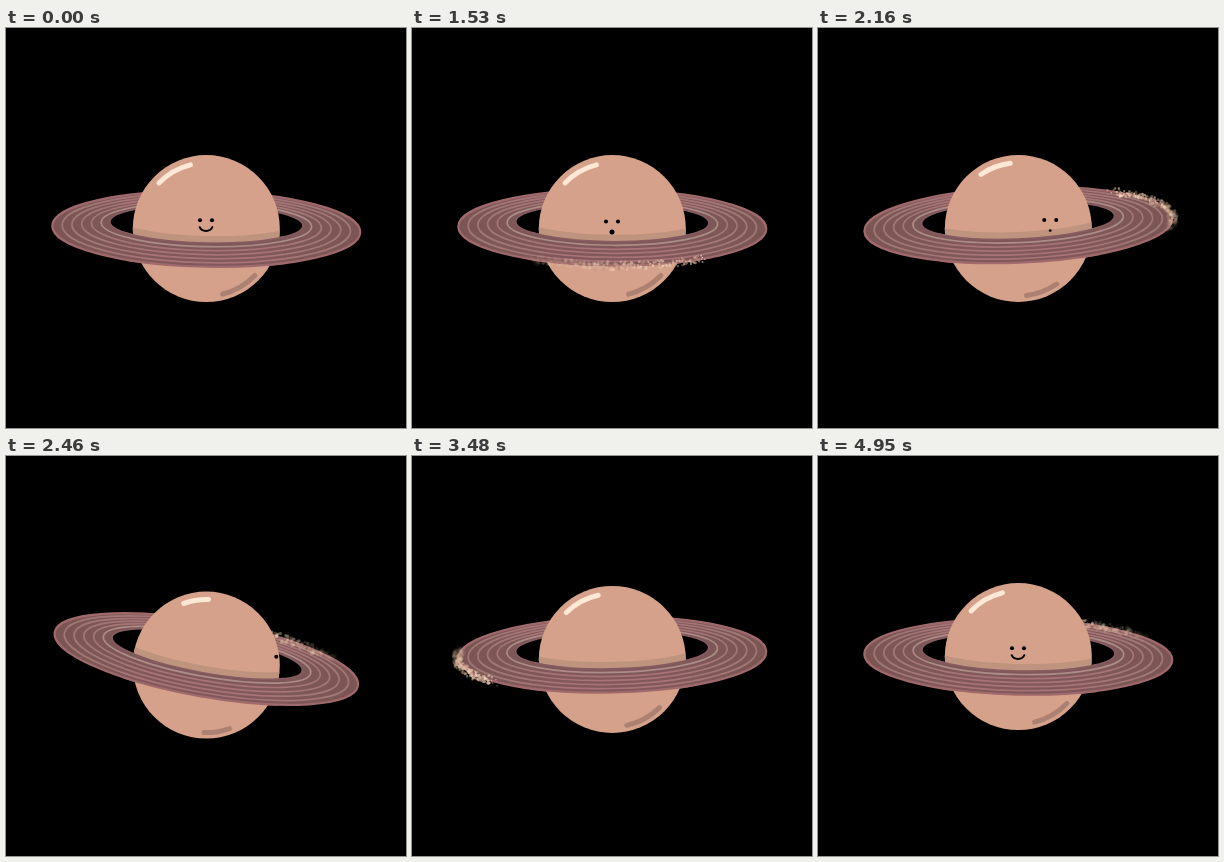
Write an HTML page with a canvas that moves like this. It is 400 px wide and 400 px high and loops after 4.98 s.

```html
<!DOCTYPE html>
<html lang="en">
<head>
<meta charset="utf-8">
<title>Ringed planet</title>
<style>
  html, body { margin: 0; width: 100%; height: 100%; overflow: hidden; background: #000; }
  canvas { display: block; width: 100vmin; height: 100vmin; }
</style>
</head>
<body>
<canvas id="stage"></canvas>
<script>
const LOOP = 4980, STEP = 30, ORBIT = LOOP / 2;
const LAND = 2460, HOP = 430;
const CX = 200.3, R = 73.5;
const TAU = Math.PI * 2, RAD = Math.PI / 180;
const { sin, cos, exp, max, min } = Math;

const canvas = document.getElementById('stage');
const g = canvas.getContext('2d');
const ratio = max(1, window.devicePixelRatio || 1);
canvas.width = canvas.height = 400 * ratio;

const ease = (t, from, to) => {
  const u = min(1, max(0, (t - from) / (to - from)));
  return u * u * (3 - 2 * u);
};
const hump = (t, from, to) => t > from && t < to ? sin(Math.PI * (t - from) / (to - from)) ** 2 : 0;
const noise = n => {
  const s = sin(n * 127.1 + 11.7) * 43758.5453;
  return s - Math.floor(s);
};

// Everything that moves, derived from the time.
function pose(t) {
  const turn = TAU * t / LOOP;
  const bob = hump(t % ORBIT, 0, 1530);
  const hop = ease(t, 1700, 1950) * (1 - ease(t, LAND, 2760));
  const swing = cos(TAU * (t - LAND) / HOP);
  const roll = exp(-(((t - LAND) / 330) ** 2));
  return {
    y: 200.6 + 3.5 * bob + hop * (2 + 6.5 * swing),
    ringY: 199 + 2 * cos(2 * turn) + 2.3 * sin(turn) + 4.5 * bob + hop * (4.75 * swing - 2.75),
    tilt: 1.2 * cos(turn) + 0.9 * sin(turn) + hop * (1.5 + 9.7 * swing),
    spin: 21 * roll + 2 * bob,
    arc: 16 - 5 * roll,
    faceX: t < 3000 ? 200 + 103 * ease(t, 1780, 2800) : 97 + 103 * ease(t, 3400, 4505),
    lean: 1.3 * hump(t, 1000, 2060),
    smile: 1 - ease(t, 850, 1000) + ease(t, 4350, 4500),
    gasp: ease(t, 950, 1150) * (2.5 - 1.1 * ease(t, 1530, 2160)) * (1 - ease(t, 4200, 4350))
  };
}

// Angle of the dust's head, slower in front and quicker behind.
function orbitAngle(t) {
  const a = TAU * t / ORBIT;
  return a + (99 - 6.6 * sin(a) - 10.5 * (1 - cos(a))) * RAD;
}

function disc(x, y, r, color) {
  g.fillStyle = color;
  g.beginPath();
  g.arc(x, y, r, 0, TAU);
  g.fill();
}

function inRingSpace(p, draw) {
  g.save();
  g.translate(CX, p.ringY);
  g.rotate(p.tilt * RAD);
  draw();
  g.restore();
}

// Ring edges run from the outer rim (k = 0) to the hole (k = 1).
function edge(k) {
  g.ellipse(0, -5.2 * k, 154 - 57.5 * k, 37.7 - 18.5 * k, 0, 0, TAU);
}

function strokeEdge(k, color, width) {
  g.strokeStyle = color;
  g.lineWidth = width;
  g.beginPath();
  edge(k);
  g.stroke();
}

function shade(mid, side) {
  const grad = g.createLinearGradient(-155, 0, 155, 0);
  grad.addColorStop(0, side);
  grad.addColorStop(0.32, mid);
  grad.addColorStop(0.68, mid);
  grad.addColorStop(1, side);
  return grad;
}

function drawRing() {
  g.fillStyle = shade('#80585b', '#7b5553');
  g.beginPath();
  edge(0);
  edge(1);
  g.fill('evenodd');
  const line = shade('#a87376', '#9d7974');
  for (let i = 1; i < 5; i++) strokeEdge(i / 5.9, line, 1.7);
  strokeEdge(5 / 5.9, '#ad8c87', 1.7);
  strokeEdge(1, '#865c60', 1.5);
  strokeEdge(0, '#a0696c', 2.2);
}

function drawDust(t, front) {
  const life = 430, gap = 1.5;
  for (let i = max(0, Math.ceil((t - life) / gap)); i * gap < t; i++) {
    const born = i * gap, age = (t - born) / life;
    const a = orbitAngle(born % ORBIT) + (noise(i) - 0.5) * 5 * RAD;
    if ((sin(a) < 0) !== front) continue;
    const x = (155 + (noise(i + 0.37) - 0.5) * 8) * cos(a);
    const y = -38 * sin(a) + (noise(i + 0.71) - 0.5) * 8;
    const tone = noise(i + 0.59);
    g.globalAlpha = (1 - age) * (0.4 + 0.45 * noise(i + 0.13));
    disc(x, y, 0.6 + noise(i + 0.83) * 0.8 + age,
      tone < 0.5 ? '#f3d8bf' : tone < 0.8 ? '#d6ab92' : '#a98270');
  }
  g.globalAlpha = 1;
}

function shine(p, mid, r, color) {
  g.strokeStyle = color;
  g.lineWidth = 5;
  g.lineCap = 'round';
  g.beginPath();
  g.arc(CX, p.y, r, (mid + p.spin - p.arc) * RAD, (mid + p.spin + p.arc) * RAD);
  g.stroke();
}

function drawFace(p) {
  const x = p.faceX, y = p.y - 8.4 + p.lean, w = p.smile;
  disc(x - 6, y, 2, '#000');
  disc(x + 6, y, 2, '#000');
  if (w > 0.02) {
    g.strokeStyle = '#000';
    g.lineWidth = 2;
    g.beginPath();
    g.moveTo(x - 6.3 * w, y + 7);
    g.bezierCurveTo(x - 4 * w, y + 7 + 5 * w, x + 4 * w, y + 7 + 5 * w, x + 6.3 * w, y + 7);
    g.stroke();
  }
  disc(x, y + 10.5, p.gasp, '#000');
}

function drawPlanet(p) {
  g.save();
  disc(CX, p.y, R, '#d5a18a');
  g.clip();
  shine(p, -120, 65.7, '#fce8d5');
  shine(p, 60, 67.5, '#ac8172');
  // Shadow along the front inner edge of the ring.
  inRingSpace(p, () => {
    g.beginPath();
    g.rect(-160, -3, 320, 60);
    g.clip();
    strokeEdge(1, '#bf947e', 14);
  });
  drawFace(p);
  g.restore();
}

function draw(t) {
  const p = pose(t);
  g.setTransform(ratio, 0, 0, ratio, 0, 0);
  g.fillStyle = '#000';
  g.fillRect(0, 0, 400, 400);
  inRingSpace(p, () => {
    drawRing();
    drawDust(t, false);
  });
  drawPlanet(p);
  inRingSpace(p, () => {
    g.save();
    g.beginPath();
    g.rect(-R - 6, -4, 2 * R + 12, 60);
    g.clip();
    drawRing();
    g.restore();
    drawDust(t, true);
  });
}

const start = performance.now();
function frame() {
  const t = (performance.now() - start) % LOOP;
  draw(Math.floor(t / STEP) * STEP);
  requestAnimationFrame(frame);
}
frame();
</script>
</body>
</html>
```
